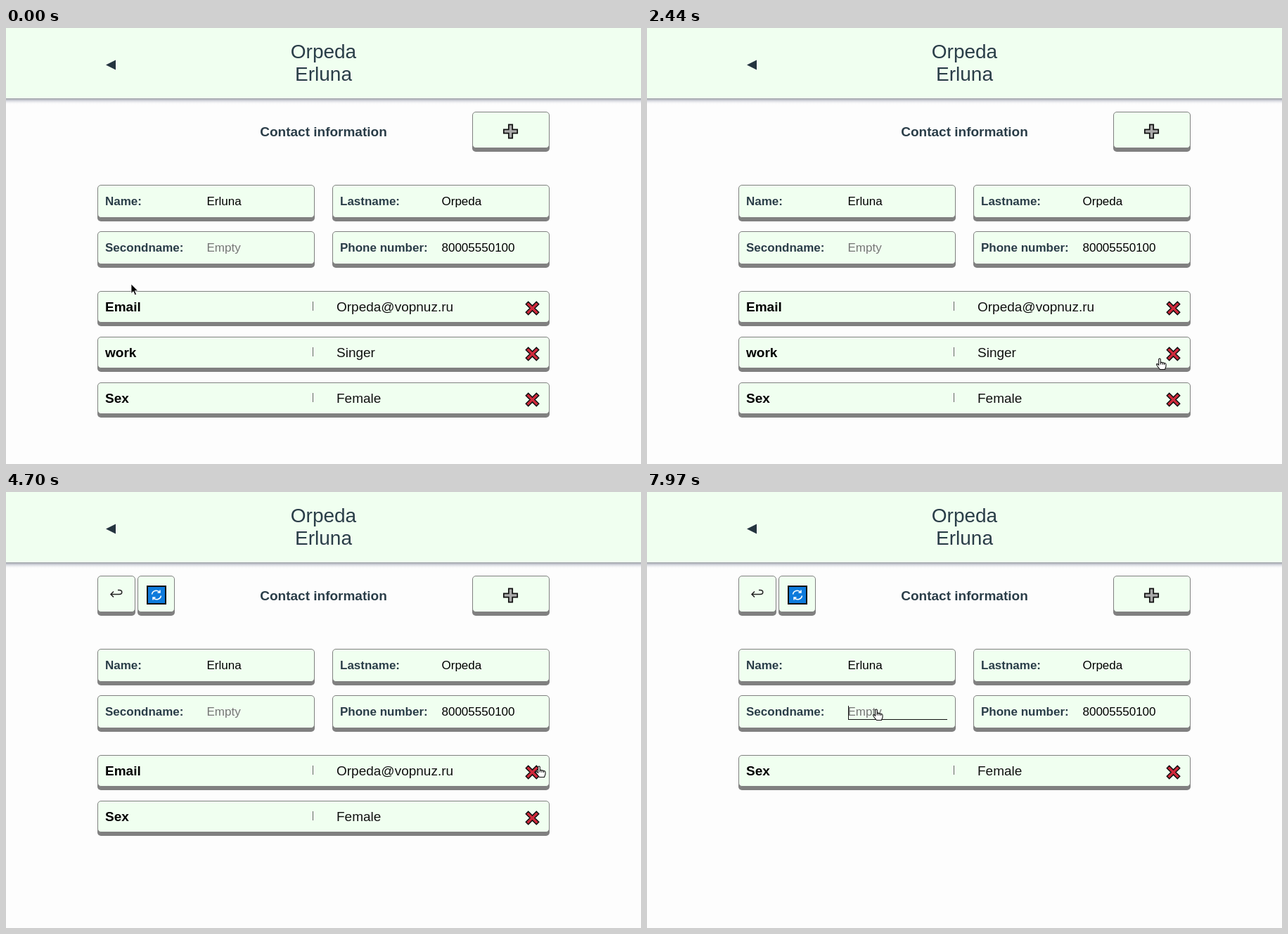
An HTML page that plays this animation: 903 px wide and 620 px high, repeating every 8 s.

```html
<!DOCTYPE html>
<html lang="en">
<head>
<meta charset="utf-8">
<title>Contact card</title>
<style>
  html, body { margin: 0; width: 100%; height: 100%; overflow: hidden; background: #fdfdfd; }
  svg { display: block; font-family: "Liberation Sans", Arial, sans-serif; }
  .bold { font-weight: bold; }
  .mid { text-anchor: middle; }
</style>
</head>
<body>
<svg id="stage" width="903" height="620" viewBox="0 0 903 620"></svg>
<script>
const LOOP = 8000;
const MINT = '#f0fff0', INK = '#2a3d48', GRAY = '#808080';

const text = (x, y, size, str, fill = '#000', cls = '') =>
  `<text x="${x}" y="${y}" font-size="${size}" fill="${fill}" class="${cls}">${str}</text>`;

// Mint panel with a thin border and a solid lower edge.
const card = (x, y, w, h, edge = GRAY) =>
  `<rect x="${x}" y="${y + 5}" width="${w}" height="${h - 5}" rx="5" fill="${GRAY}"/>
   <rect x="${x + .5}" y="${y + .5}" width="${w - 1}" height="${h - 6}" rx="4.5" fill="${MINT}" stroke="${edge}"/>`;

const cross = (x, y, r, a, fill, line, turn) =>
  `<path transform="translate(${x} ${y}) rotate(${turn})" fill="${fill}" stroke="#111" stroke-width="${line}"
    d="M${-a} ${-r}H${a}V${-a}H${r}V${a}H${a}V${r}H${-a}V${a}H${-r}V${-a}H${-a}Z"/>`;

const field = (x, y, label, value, fill) =>
  card(x, y, 309, 52) + text(x + 11, y + 29, 17, label, INK, 'bold') +
  text(x + 155.5, y + 29, 17, value, fill);

const row = (id, label, value) =>
  `<g id="${id}">${card(130, 0, 643, 50)}
   ${text(141, 29, 19, label, '#000', 'bold')}
   <path d="M436.5 15V28" stroke="#666"/>
   ${text(470, 29, 19, value, '#111')}
   ${cross(748.5, 24.5, 10.6, 2.4, '#d02a3c', 1.5, 45)}</g>`;

const header =
  `<rect y="100" width="903" height="9" fill="url(#fade)"/>
   <rect width="903" height="100" fill="${MINT}"/>
   <path d="M142 52.5L156 45.5V59.5Z" fill="#24343f"/>
   ${text(451.5, 43, 28, 'Orpeda', INK, 'mid')}
   ${text(451.5, 75, 28, 'Erluna', INK, 'mid')}`;

const tools =
  `<g id="tools">${card(130, 119, 54, 57)}${card(187, 119, 53, 57)}
   <path d="M153 141.5L149 145.5L153 149.5M149 145.5H161C166 145.5 166 139.5 161 139.5H159"
     fill="none" stroke="#222" stroke-width="1.5"/>
   <rect x="201" y="134" width="26" height="25" fill="#0d7bdc" stroke="#111" stroke-width="2"/>
   <path d="M207.5 145.5A6.3 6.3 0 0 1 218.500 142.500M220.500 147.500A6.300 6.300 0 0 1 209.500 150.500
     M219 139.500V143H215.500M209 153.500V150H212.500" fill="none" stroke="#fff" stroke-width="1.500"/></g>`;

const modal =
  `<g id="modal"><rect width="903" height="620" fill="${MINT}" opacity=".66"/>
   ${card(215, 175, 473, 241, '#555')}
   ${text(451.5, 235, 23.5, 'Are you sure you want to delete the', '#1c2b38', 'bold mid')}
   <text id="question" x="451.5" y="262" font-size="23.5" fill="#1c2b38" class="bold mid"></text>
   <rect x="317" y="359" width="35" height="35" fill="#1fe010" stroke="#111" stroke-width="2"/>
   <path d="M324 377L330.5 383L344.5 368" fill="none" stroke="#fff" stroke-width="2.6"/>
   ${cross(569, 376.5, 18.6, 3.4, '#e8220f', 2.2, 45)}</g>`;

const pointers =
  `<path id="arrow" d="M0 0V13.5L3.1 10.6L5.3 15.8L7.5 14.8L5.3 9.8H9.6Z"
     fill="#000" stroke="#fff" stroke-width=".8"/>
   <path id="hand" d="M-1.3 1Q0 -1 1.3 1V6Q2.9 4.6 4 6.2Q5.6 5.2 6.5 6.8Q8.8 6.2 9 8.3
     V11.5L7.5 15.5H.5L-3.5 10.5Q-5.5 7.6 -3.3 7.5L-1.3 9.2ZM1.3 6V8.5M4 6.5V8.7M6.5 7V9"
     fill="#fff" stroke="#111" stroke-width="1.1"/>`;

document.getElementById('stage').innerHTML =
  `<defs><linearGradient id="fade" x2="0" y2="1">
     <stop stop-color="#9a9da4"/><stop offset=".35" stop-color="#d0d2da"/>
     <stop offset="1" stop-color="#fdfdfd" stop-opacity="0"/></linearGradient></defs>
   <rect width="903" height="620" fill="#fdfdfd"/>` +
  header + tools +
  text(451.5, 154, 19, 'Contact information', INK, 'bold mid') +
  card(663, 119, 110, 57) + cross(717.5, 147, 9.7, 2.7, '#aaa', 1.7, 0) +
  field(130, 223, 'Name:', 'Erluna') +
  field(464, 223, 'Lastname:', 'Orpeda') +
  field(130, 289, 'Secondname:', 'Empty', '#757575') +
  field(464, 289, 'Phone number:', '80005550100') +
  `<path id="focus" d="M286 323.5H427" stroke="#111"/>
   <path id="caret" d="M286.5 304V324" stroke="#111"/>` +
  row('email', 'Email', 'Orpeda@vopnuz.ru') +
  row('work', 'work', 'Singer') +
  row('sex', 'Sex', 'Female') +
  modal + pointers;

// Pointer stops: time, x, y, and whether the hand shows from then on.
const stops = [
  [0, 178, 364, 0], [100, 178, 364, 0], [780, 360, 588, 0], [1720, 360, 588, 0],
  [2330, 729, 471, 1], [2440, 729, 470, 1], [2850, 729, 470, 0],
  [3440, 296, 362, 0], [3560, 334, 366, 1], [3850, 334, 366, 0],
  [4540, 758, 390, 1], [4900, 758, 390, 0],
  [5480, 335, 364, 1], [5900, 335, 364, 0], [6350, 318, 382, 0],
  [6750, 318, 382, 0], [7250, 326, 309, 1], [LOOP, 326, 309, 1]
];
const dialogs = [[2700, 3780, 'work'], [4840, 5780, 'Email']];
const FOCUS = 7500;

const el = id => document.getElementById(id);
const show = (id, on) => el(id).style.display = on ? '' : 'none';
const place = (id, x, y) => el(id).setAttribute('transform', `translate(${x} ${y})`);
const ease = p => p * p * (3 - 2 * p);

function draw(t) {
  const [workGone, emailGone] = dialogs.map(d => t >= d[1]);
  const gone = { work: workGone, email: emailGone };
  let y = 374;
  for (const id of ['email', 'work', 'sex']) {
    show(id, !gone[id]);
    if (gone[id]) continue;
    place(id, 0, y);
    y += 65;
  }
  show('tools', workGone);

  const open = dialogs.find(d => t >= d[0] && t < d[1]);
  show('modal', open);
  if (open) el('question').textContent = `field ${open[2]}?`;

  show('focus', t >= FOCUS);
  show('caret', t >= FOCUS && (t - FOCUS) % 1000 < 500);

  const i = stops.findIndex(s => s[0] > t) - 1;
  const [t0, x0, y0, hand] = stops[i], [t1, x1, y1] = stops[i + 1];
  const p = ease((t - t0) / (t1 - t0));
  show('hand', hand);
  show('arrow', !hand);
  place(hand ? 'hand' : 'arrow', x0 + (x1 - x0) * p, y0 + (y1 - y0) * p);
}

const start = performance.now();
function tick() {
  draw((performance.now() - start) % LOOP);
  requestAnimationFrame(tick);
}
tick();
</script>
</body>
</html>
```
